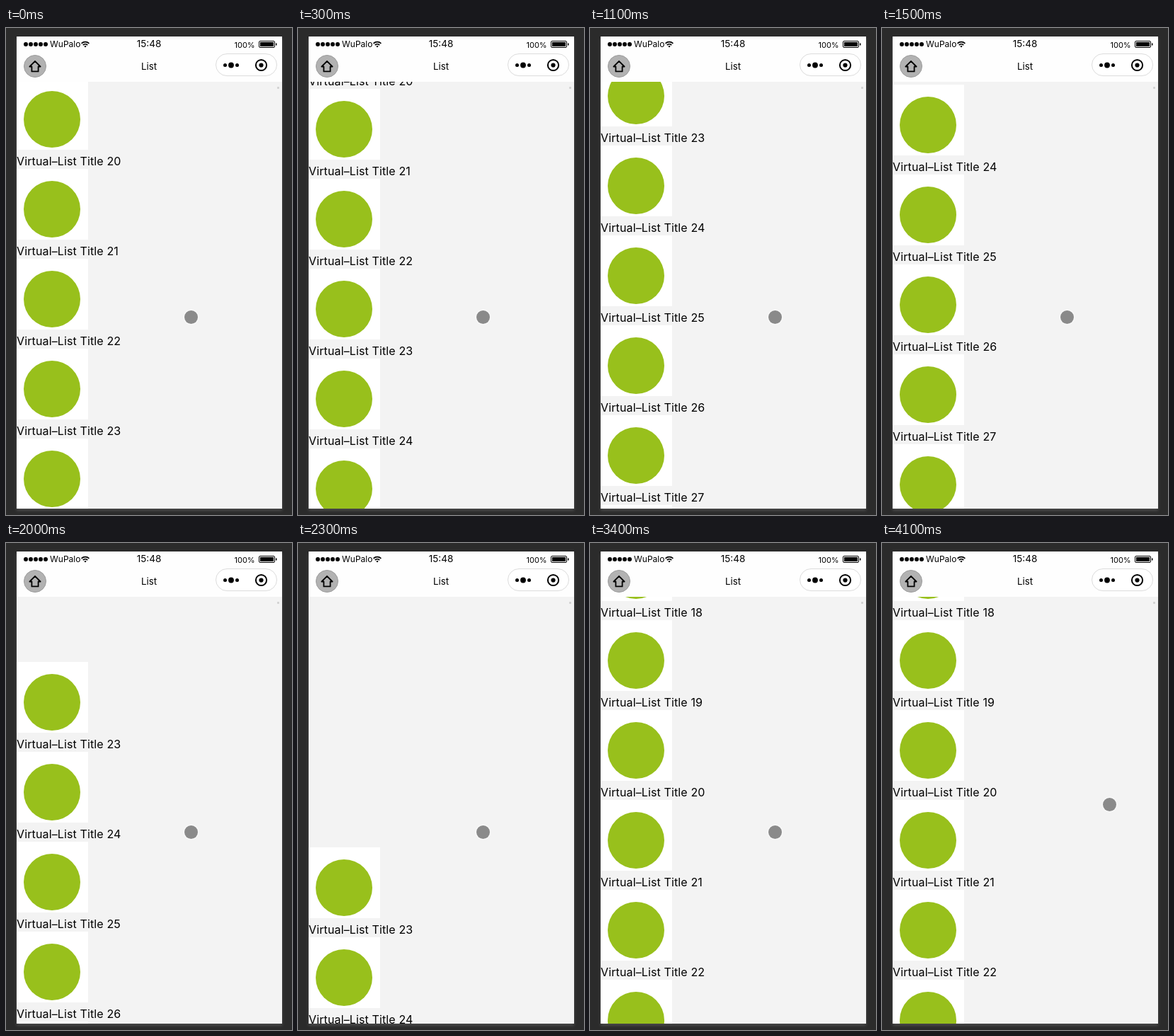
Animation of 404 by 688 pixels, one loop 4200 ms. Source, as an HTML page:

```html
<!DOCTYPE html>
<html lang="en">
<head>
<meta charset="utf-8">
<title>List</title>
<style>
  html, body { margin: 0; width: 100%; height: 100%; overflow: hidden; background: #2b2b2b; }
  svg { display: block; }
  text { font-family: Inter, Roboto, sans-serif; fill: #000; }
  .mid { text-anchor: middle; }
  .row { font-size: 16px; letter-spacing: .13px; }
  .glow { fill: #fff; opacity: .14; filter: blur(2px); }
</style>
</head>
<body>
<svg width="404" height="688" viewBox="0 0 404 688">
  <rect width="404" height="688" fill="#2b2b2b"/>
  <rect class="glow" x="15" y="15" width="375" height="667"/>
  <rect x="15" y="12" width="375" height="667" fill="#f3f3f3"/>

  <svg x="15" y="76" width="375" height="603" overflow="hidden">
    <g id="list"></g>
    <rect x="368" y="7" width="3" height="3" rx="1" fill="#d2d2d2"/>
  </svg>

  <rect x="15" y="12" width="375" height="64" fill="#fefefe"/>

  <!-- status bar -->
  <path d="M28 23h28.1" stroke="#000" stroke-width="6" stroke-linecap="round" stroke-dasharray="0 7"/>
  <text x="62" y="27" font-size="12">WuPalo</text>
  <g fill="none" stroke="#000" stroke-width="1.7">
    <path d="M106.6 21.8a7.8 7.8 0 0 1 10.8 0M108.8 24.2a4.7 4.7 0 0 1 6.4 0"/>
    <path d="M112 27.6l-1.7-1.8a2.5 2.5 0 0 1 3.4 0z" fill="#000" stroke="none"/>
  </g>
  <text class="mid" x="202" y="27.3" font-size="13.5">15:48</text>
  <text x="322.5" y="27.5" font-size="11">100%</text>
  <rect x="357.5" y="18.5" width="22" height="9" rx="1.5" fill="none" stroke="#000"/>
  <path d="M359 20h19v6h-19zM381 21.5h1.5v3h-1.5z"/>

  <!-- navigation bar -->
  <circle cx="41" cy="54" r="15.5" fill="#b2b2b2" stroke="#9c9c9c"/>
  <path d="M41 46.8l-7.6 7.7h3v6.9h9.2v-6.9h3z" fill="none" stroke="#000" stroke-width="1.8" stroke-linejoin="round"/>
  <text class="mid" x="202" y="59.3" font-size="13.3">List</text>
  <rect x="296.5" y="36.5" width="86" height="31" rx="15.5" fill="#fff" stroke="#dcdcdc"/>
  <circle cx="309.5" cy="52.5" r="2.5"/>
  <circle cx="318" cy="52.5" r="3.9"/>
  <circle cx="326.5" cy="52.5" r="2.5"/>
  <circle cx="360.5" cy="52.5" r="7.6" fill="none" stroke="#000" stroke-width="2"/>
  <circle cx="360.5" cy="52.5" r="3.1"/>

  <g id="pointer">
    <circle r="11" fill="#f8f8f8"/>
    <circle r="9.5" fill="#8a8a8a"/>
  </g>
</svg>
<script>
const LOOP = 4200, STEP = 100, PITCH = 127, FIRST = 17, LAST = 30;
const list = document.getElementById('list');
const pointer = document.getElementById('pointer');

for (let n = FIRST; n <= LAST; n++) {
  list.insertAdjacentHTML('beforeend', `<g transform="translate(0 ${(n - 20) * PITCH})">
    <rect width="101" height="100" fill="#fff"/>
    <circle cx="50" cy="57" r="40" fill="#98c01c"/>
    <text class="row" y="122">Virtual–List Title ${n}</text></g>`);
}
const rows = [...list.children];

// [time, top of row 20, speed in px per ms]
const keys = [
  [0, 72, -0.38], [700, -187, -0.35], [1500, -428, 0],
  [2000, -213, 0.8], [2600, 212, 0.14], [3000, 236, 0], [LOOP, 236, 0]
];

function scrollAt(t) {
  const i = keys.findIndex(k => k[0] > t);
  const [t0, y0, v0] = keys[i - 1], [t1, y1, v1] = keys[i];
  const d = t1 - t0, u = (t - t0) / d, w = 1 - u;
  return w * w * ((1 + 2 * u) * y0 + u * d * v0) + u * u * ((3 - 2 * u) * y1 - w * d * v1);
}

// Rows above the mounted window stay blank until the list catches up.
const firstMounted = t => t >= 1500 && t < 2900 ? 23 : FIRST;

function draw(now) {
  const t = Math.floor(now % LOOP / STEP) * STEP;
  list.setAttribute('transform', `translate(0 ${Math.round(scrollAt(t)) - 76})`);
  const first = firstMounted(t);
  rows.forEach((row, i) => row.style.display = FIRST + i < first ? 'none' : '');
  const u = Math.min(1, Math.max(0, (t - 3700) / 400)), e = u * u * (3 - 2 * u);
  pointer.setAttribute('transform', `translate(${261.5 + 60 * e} ${408.5 - 39 * e})`);
}

const start = performance.now();
function tick() {
  draw(performance.now() - start);
  requestAnimationFrame(tick);
}
tick();
</script>
</body>
</html>
```
